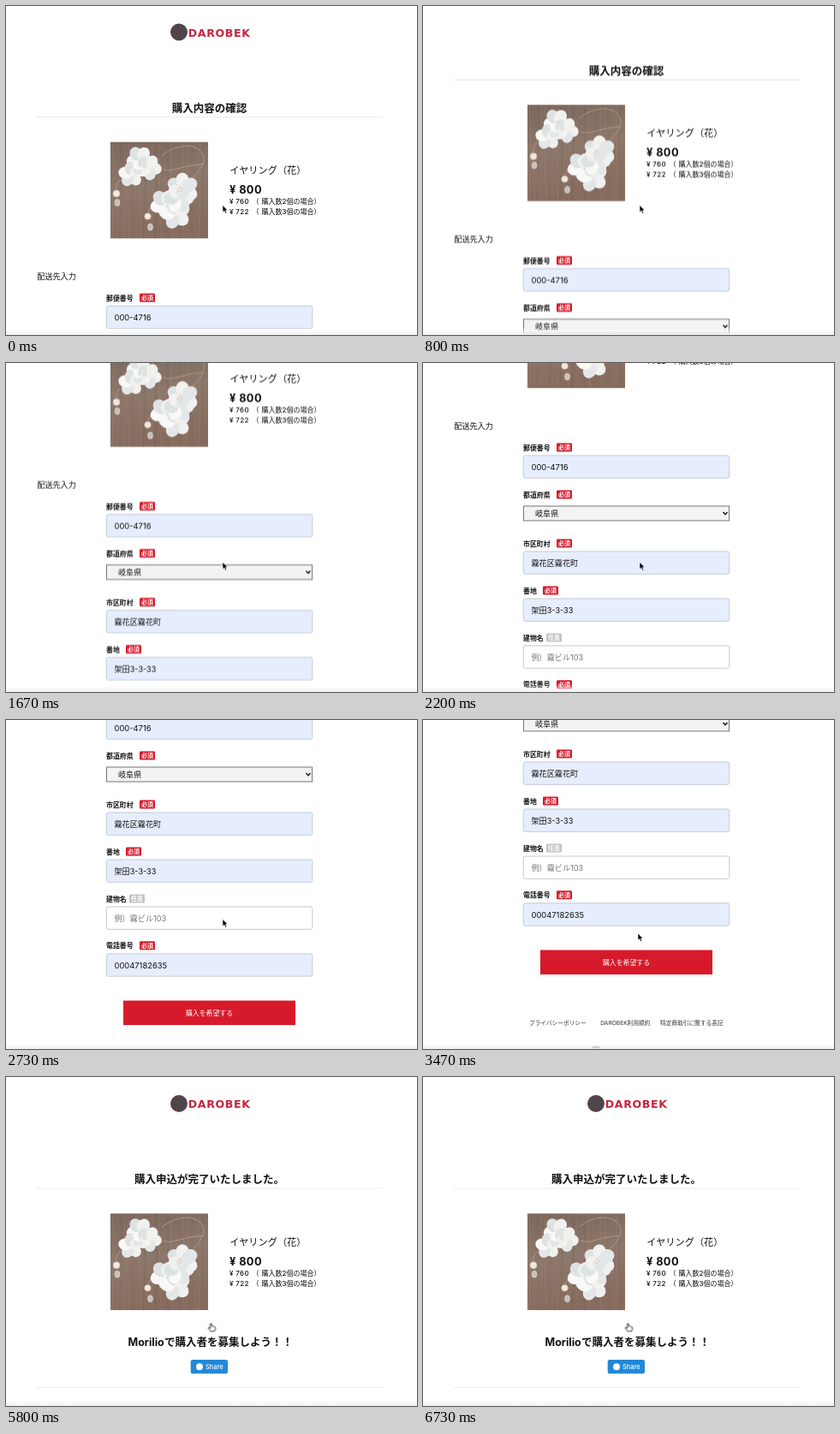
Write an HTML page that moves like this. It is 480x384 px and loops after 6.79 s.

```html
<!DOCTYPE html>
<html lang="ja">
<head>
<meta charset="utf-8">
<title>購入内容の確認</title>
<style>
  html, body { margin: 0; width: 100%; height: 100%; overflow: hidden; background: #fff; }
  svg { display: block; width: 100%; height: 100%; }
  text { font-family: Inter, "Noto Sans CJK JP", "Noto Sans CJK", sans-serif; fill: #111; white-space: pre; }
  .h { font-size: 12.5px; font-weight: 700; }
  .price { font-size: 12.8px; letter-spacing: .4px; }
  .mid { text-anchor: middle; }
  .end { text-anchor: end; }
  .brand { font: 700 12.5px "DejaVu Sans", sans-serif; letter-spacing: .7px; fill: #c9243f; }
  .name { font-size: 11.2px; }
  .small { font-size: 7.9px; }
  .rates { font-size: 8px; font-weight: 500; }
  .label { font-size: 7.9px; font-weight: 700; }
  .badge { font-size: 7px; font-weight: 700; fill: #fff; }
  .value { font-size: 9.1px; }
  .num { font-size: 9.4px; }
  .hint { fill: #777; }
  .foot { font-size: 6.7px; fill: #333; }
  .rule { stroke: #ececec; }
  .box { fill: #e6edfc; stroke: #c5cad6; }
  .empty { fill: #fff; stroke: #c8c8c8; }

  .form, .done, .early, .late, .page, .pointer, .arrow, .hand, .ring { animation: 6790ms infinite step-end; }
  .form { animation-name: form; }
  .done { animation-name: done; }
  .early { animation-name: early; }
  .late { animation-name: late; }
  .arrow { animation-name: arrow; }
  .hand { animation-name: hand; }
  .page { animation-name: scroll; }
  .pointer { animation-name: point; animation-timing-function: linear; }
  .ring { animation-name: focus; animation-timing-function: linear; }

  @keyframes form { 0% { opacity: 1 } 75.5%, 100% { opacity: 0 } }
  @keyframes done { 0% { opacity: 0 } 75.5%, 100% { opacity: 1 } }
  @keyframes early { 0% { opacity: 1 } 85.4%, 100% { opacity: 0 } }
  @keyframes late { 0% { opacity: 0 } 85.4%, 100% { opacity: 1 } }
  @keyframes arrow { 0% { opacity: 1 } 53%, 100% { opacity: 0 } }
  @keyframes hand { 0% { opacity: 0 } 53%, 100% { opacity: 1 } }
  @keyframes focus { 0%, 60.8% { opacity: 0 } 62.9%, 100% { opacity: 1 } }
  /* wheel scrolling advances in ticks of 1/15 s */
  @keyframes scroll {
    0% { transform: translateY(0) }
    7.8% { transform: translateY(0); animation-timing-function: steps(12) }
    19.55% { transform: translateY(-130.5px); animation-timing-function: steps(13) }
    32.35% { transform: translateY(-242px); animation-timing-function: steps(5) }
    37.2% { transform: translateY(-250px) }
    38.2% { transform: translateY(-250px); animation-timing-function: steps(2) }
    40.15% { transform: translateY(-354px); animation-timing-function: steps(3) }
    43.1% { transform: translateY(-394px); animation-timing-function: steps(6) }
    49%, 100% { transform: translateY(-413px) }
  }
  @keyframes point {
    0%, 50% { transform: translate(253px, 232.5px) }
    51.05%, 52% { transform: translate(251px, 249px) }
    55% { transform: translate(241px, 283px) }
    60%, 65.8% { transform: translate(240px, 286px) }
    69.6%, 100% { transform: translate(239.5px, 287.5px) }
  }
</style>
</head>
<body>
<svg viewBox="0 0 480 384" preserveAspectRatio="none">
  <defs>
    <linearGradient id="wood" x2=".2" y2="1">
      <stop offset="0" stop-color="#7c665b"/><stop offset=".5" stop-color="#8d776b"/><stop offset="1" stop-color="#866c5e"/>
    </linearGradient>
    <linearGradient id="shade" x2="0" y2="1">
      <stop offset="0" stop-color="#fff" stop-opacity="0"/><stop offset="1" stop-color="#eee"/>
    </linearGradient>
    <clipPath id="frame"><rect width="114" height="113"/></clipPath>

    <g id="logo">
      <circle cx="202" cy="30.5" r="10" fill="#51454b"/>
      <text class="brand" x="212.7" y="35.7">DAROBEK</text>
    </g>

    <g id="product">
      <g transform="translate(122 158.5)" clip-path="url(#frame)">
        <rect width="114" height="113" fill="url(#wood)"/>
        <g id="grain" fill="none" stroke-width="1"></g>
        <g fill="none" stroke="#b9a184" stroke-width=".8">
          <path d="M60 16C78 2 98 2 106 12S104 34 96 42"/>
          <path d="M62 32C74 36 80 28 108 26"/>
          <path d="M7 56Q6 48 12 44M44 82Q46 76 52 72"/>
        </g>
        <g id="petals"></g>
        <g fill="#f3e8dc" stroke="#c9b9a8" stroke-width=".5">
          <circle cx="40" cy="28" r="2.2"/><circle cx="81" cy="56" r="2.4"/>
          <circle cx="7" cy="60.5" r="4"/><circle cx="43.5" cy="87" r="3.8"/>
        </g>
        <g fill="#c9c0ba" stroke="#e6e0dc" stroke-width=".6">
          <ellipse cx="8" cy="71" rx="3" ry="4"/><ellipse cx="46.5" cy="99.5" rx="3" ry="4"/>
        </g>
      </g>
      <text class="name" x="261.3" y="196">イヤリング（花）</text>
      <text class="h price" x="261" y="218.9">¥ 800</text>
      <g class="rates">
        <text x="261" y="231.2" letter-spacing=".35">¥ 760</text><text x="287.5" y="231.2">（</text><text x="298.5" y="231.2">購入数2個の場合）</text>
        <text x="261" y="243.2" letter-spacing=".35">¥ 722</text><text x="287.5" y="243.2">（</text><text x="298.5" y="243.2">購入数3個の場合）</text>
      </g>
    </g>

    <g id="links">
      <text class="foot" x="124" y="2.5">プライバシーポリシー</text>
      <text class="foot end" x="265.5" y="2.5">DAROBEK利用規約</text>
      <text class="foot" x="277" y="2.5">特定商取引に関する表記</text>
    </g>
  </defs>

  <rect width="480" height="384" fill="#fff"/>

  <g class="form">
    <g class="page">
      <use href="#logo"/>
      <text class="h mid" x="237.5" y="123.7">購入内容の確認</text>
      <path class="rule" d="M36 129.5H440"/>
      <use href="#product"/>
      <text x="36.3" y="318.8" font-size="9.1">配送先入力</text>
      <g id="fields"></g>
      <rect class="ring" x="117.2" y="626.7" width="240.6" height="26.4" rx="2.5" fill="none" stroke="#1f57a4" stroke-width="1.6"/>
      <rect x="137" y="681.5" width="201" height="28.5" fill="#d71a2b"/>
      <text class="small mid" x="237.5" y="698.6" style="fill:#fff">購入を希望する</text>
      <use href="#links" y="766.5"/>
      <use href="#logo" y="773"/>
    </g>
  </g>

  <g class="done">
    <use href="#logo" y=".5"/>
    <text class="h mid" x="237.5" y="123.9">購入申込が完了いたしました。</text>
    <path class="rule" d="M36 130H440"/>
    <use href="#product" y=".7"/>
    <text class="h end" x="184.8" y="314">Morilio</text>
    <text class="h" x="185" y="314">で購入者を募集しよう！！</text>
    <g class="early">
      <path class="rule" d="M36 342.5H440"/>
      <use href="#links" y="375"/>
    </g>
    <g class="late">
      <rect x="215.7" y="330" width="43.3" height="16.2" rx="2.2" fill="#2488d6"/>
      <circle cx="226" cy="338.2" r="4" fill="#fff"/>
      <text x="233" y="340.9" font-size="7.4" font-weight="500" style="fill:#fff">Share</text>
      <path class="rule" d="M36 362.5H440"/>
    </g>
  </g>

  <rect y="375" width="480" height="9" fill="url(#shade)"/>

  <g class="pointer">
    <path class="arrow" d="M0 0V8.2L1.9 6.5L3.2 9.5L4.7 8.9L3.4 6H6Z" fill="#000" stroke="#fff" stroke-width=".6"/>
    <path class="hand" d="M-.9 .8Q0-.6 .9 .8V3.5Q2 2.8 2.6 3.8Q3.6 3.2 4.1 4.2Q5.2 4 5.2 5.2Q5.2 7.4 4.2 9.2H-.8Q-1.8 7.4-3.4 5.7Q-3.4 4.4-2.1 4.9L-.9 6Z" fill="#fff" stroke="#222" stroke-width=".9"/>
  </g>
</svg>

<script>
  const put = (id, html) => document.getElementById(id).innerHTML = html;

  // label, centre of the label line, badge x, value, value class
  const fields = [
    ['郵便番号', 340.5, 156, '000-4716', 'num'],
    ['都道府県', 395.5, 156, '岐阜県', 'select'],
    ['市区町村', 452.5, 156, '霧花区霧花町', ''],
    ['番地', 507.5, 140, '架田3-3-33', ''],
    ['建物名', 562.5, 144, '例）霧ビル103', 'hint'],
    ['電話番号', 617.3, 156, '00047182635', 'num'],
  ];

  function field([label, y, bx, value, kind]) {
    const optional = kind === 'hint';
    const head = `<text class="label" x="117" y="${y + 3}">${label}</text>
      <rect x="${bx}" y="${y - 5}" width="18" height="10" rx="1" fill="${optional ? '#c4c4c4' : '#d71a2b'}"/>
      <text class="badge mid" x="${bx + 9}" y="${y + 2.7}">${optional ? '任意' : '必須'}</text>`;
    if (kind === 'select') {
      return head + `<rect x="117.5" y="${y + 13.5}" width="240" height="17" fill="#f3f3f3" stroke="#777"/>
        <text class="value" x="131" y="${y + 25.3}">${value}</text>
        <path d="M350.5 ${y + 20.5}l2.5 2.7l2.5-2.7" fill="none" stroke="#111" stroke-width="1.4"/>`;
    }
    return head + `<rect class="${optional ? 'empty' : 'box'}" x="117.3" y="${y + 9.5}" width="240.5" height="26.3" rx="2"/>
      <text class="value ${kind}" x="126.5" y="${y + 26.2}">${value}</text>`;
  }
  put('fields', fields.map(field).join(''));

  let grain = '';
  for (let i = 0; i < 26; i++) {
    const x = i * 4.6 - 2, bend = 3 * Math.sin(i * 2.3);
    grain += `<path d="M${x} 0q${bend} 55 ${-bend / 2} 113" stroke="${i % 3 ? '#a18b7d' : '#665146'}" opacity="${.2 + .15 * Math.sin(i * 1.7)}"/>`;
  }
  put('grain', grain);

  const tones = ['#f1f1ef', '#e4e7e7', '#f8f8f7', '#dde2e3'];
  function bloom(cx, cy, count, dist, size, turn) {
    let out = '';
    for (let i = 0; i < count; i++) {
      const a = turn + i * 360 / count;
      out += `<ellipse cx="${dist}" rx="${size}" ry="${size * .86}" fill="${tones[i % 4]}" transform="translate(${cx} ${cy}) rotate(${a})"/>`;
    }
    return out;
  }
  put('petals',
    bloom(34, 20, 5, 7, 8.5, 20) + bloom(24, 38, 5, 7, 8, 50) + bloom(45, 30, 5, 7, 8, 10) + bloom(36, 30, 5, 5, 6, 70) +
    bloom(84, 55, 6, 10, 9, 30) + bloom(63, 72, 5, 8, 9, 15) + bloom(76, 84, 5, 9, 9, 40) + bloom(80, 66, 6, 9, 8.5, 0));
</script>
</body>
</html>
```
